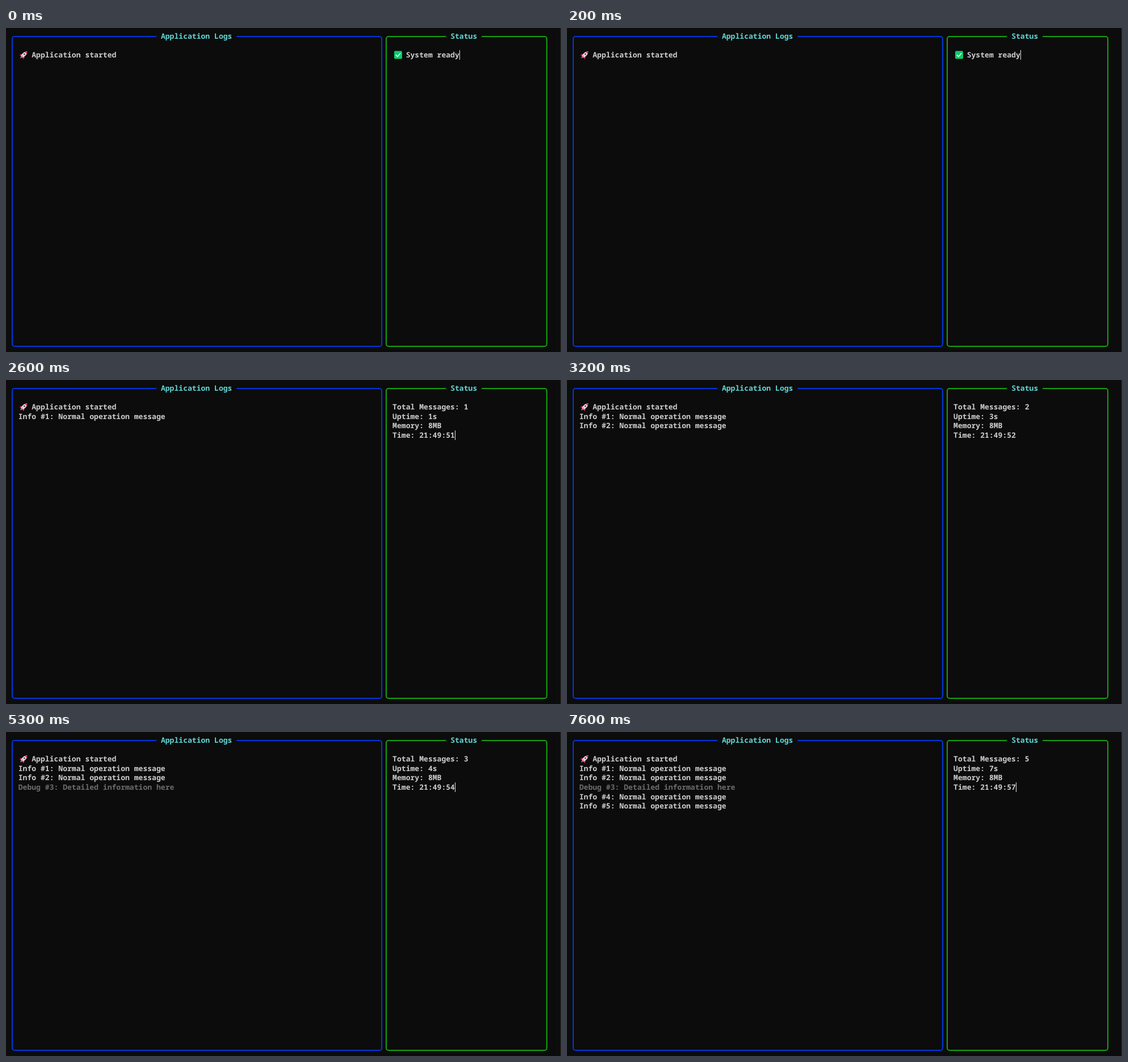
Write an HTML page with a canvas that moves like this. It is 978 by 572 pixels and loops after 8 s.

```html
<!DOCTYPE html>
<html lang="en">
<head>
<meta charset="utf-8">
<title>Terminal log panels</title>
<style>
  html, body { margin: 0; width: 100%; height: 100%; overflow: hidden; background: #0c0c0c; }
  canvas { display: block; }
</style>
</head>
<body>
<canvas id="stage" width="978" height="572"></canvas>
<script>
const ctx = document.getElementById('stage').getContext('2d');
const LOOP = 8000;
const CELL_W = 7.85, CELL_H = 16.6, ORIGIN = 6;
const STEP = 1500, FIRST = 1600;
const BACK = '#0c0c0c', TEXT = '#cccccc', DIM = '#6c6c6c';
const TITLE = '#61d6d6', BLUE = '#0037da', GREEN = '#13a10e';

// Times at which the caret flips; it starts visible.
const FLIPS = [400, 1000, 1500, 1600, 2100, 2600, 3200, 3700, 4200, 4600,
  4800, 5300, 5900, 6100, 6400, 7000, 7500, 7600];

const colX = c => ORIGIN + c * CELL_W;
const rowY = r => ORIGIN + r * CELL_H;

function print(text, col, row, color = TEXT) {
  ctx.fillStyle = color;
  ctx.fillText(text, colX(col), rowY(row) + 13);
}

function caret(col, row) {
  ctx.fillStyle = '#e6e6e6';
  ctx.fillRect(Math.round(colX(col)), Math.round(rowY(row)), 1, 17);
}

// Rounded frame whose top edge is broken by a title.
function panel(left, right, color, title, col) {
  const top = 15, bottom = 562, r = 4;
  ctx.strokeStyle = color;
  ctx.lineWidth = 2;
  ctx.beginPath();
  ctx.moveTo(colX(col - 1), top);
  ctx.arcTo(left, top, left, bottom, r);
  ctx.arcTo(left, bottom, right, bottom, r);
  ctx.arcTo(right, bottom, right, top, r);
  ctx.arcTo(right, top, left, top, r);
  ctx.lineTo(colX(col + title.length + 1), top);
  ctx.stroke();
  print(title, col, 0, TITLE);
}

function shape(color, path) {
  ctx.fillStyle = color;
  ctx.fill(new Path2D(path));
}

function rocket(x, y) {
  ctx.save();
  ctx.translate(x, y);
  ctx.rotate(Math.PI / 4);
  shape('#f0803c', 'M-1.6 4.5 L1.6 4.5 L0 8.8 Z');
  shape('#d8305c', 'M-2.4 0 Q-5.2 2 -4.8 6 L-1.8 4 Z M2.4 0 Q5.2 2 4.8 6 L1.8 4 Z');
  shape('#e9e2ea', 'M0 -9 Q3.2 -5.5 3 -1 Q2.9 2.5 1.8 5 L-1.8 5 Q-2.9 2.5 -3 -1 Q-3.2 -5.5 0 -9 Z');
  shape('#d8305c', 'M0 -9 Q2 -7 2.6 -4.8 Q0 -5.8 -2.6 -4.8 Q-2 -7 0 -9 Z');
  shape('#d8305c', 'M-0.6 2 H0.6 V6 H-0.6 Z');
  ctx.fillStyle = '#4a4f63';
  ctx.beginPath();
  ctx.arc(0, -1.9, 1.5, 0, Math.PI * 2);
  ctx.fill();
  ctx.restore();
}

function checkBox(x, y) {
  ctx.fillStyle = '#0ccb6c';
  ctx.beginPath();
  ctx.roundRect(x, y, 14, 14, 2);
  ctx.fill();
  ctx.strokeStyle = '#ffffff';
  ctx.lineWidth = 1.5;
  ctx.lineCap = ctx.lineJoin = 'round';
  ctx.beginPath();
  ctx.moveTo(x + 3.3, y + 7.4);
  ctx.lineTo(x + 5.8, y + 9.9);
  ctx.lineTo(x + 10.8, y + 4.5);
  ctx.stroke();
  ctx.lineCap = 'butt';
  ctx.lineJoin = 'miter';
}

function logs(count) {
  rocket(31, 47.5);
  print('Application started', 5, 2);
  for (let n = 1; n <= count; n++) {
    if (n === 3) print(`Debug #${n}: Detailed information here`, 2, 2 + n, DIM);
    else print(`Info #${n}: Normal operation message`, 2, 2 + n);
  }
}

function status(count, caretOn) {
  if (!count) {
    checkBox(684, 40.5);
    print('System ready', 89, 2);
    if (caretOn) caret(101, 2);
    return;
  }
  const secs = count * STEP / 1000;
  const lines = [
    `Total Messages: ${count}`,
    `Uptime: ${Math.floor(secs)}s`,
    'Memory: 8MB',
    `Time: 21:49:${Math.floor(49.6 + secs)}`
  ];
  lines.forEach((line, i) => print(line, 86, 2 + i));
  if (caretOn) caret(100, 5);
}

function draw(t) {
  ctx.fillStyle = BACK;
  ctx.fillRect(0, 0, 978, 572);
  ctx.fillStyle = '#2b2b2b';
  ctx.fillRect(977, 0, 1, 572);
  if (t >= 100 && t < 200) {
    caret(0, 0);
    return;
  }
  ctx.font = '600 13.09px "Noto Sans Mono", "DejaVu Sans Mono", monospace';
  ctx.textRendering = 'geometricPrecision';
  const count = t < FIRST ? 0 : 1 + Math.floor((t - FIRST) / STEP);
  const caretOn = FLIPS.filter(f => f <= t).length % 2 === 0;
  panel(11, 662, BLUE, 'Application Logs', 34);
  panel(670, 953, GREEN, 'Status', 99);
  logs(count);
  status(count, caretOn);
}

const start = performance.now();
function tick() {
  draw((performance.now() - start) % LOOP);
  requestAnimationFrame(tick);
}
tick();
</script>
</body>
</html>
```
